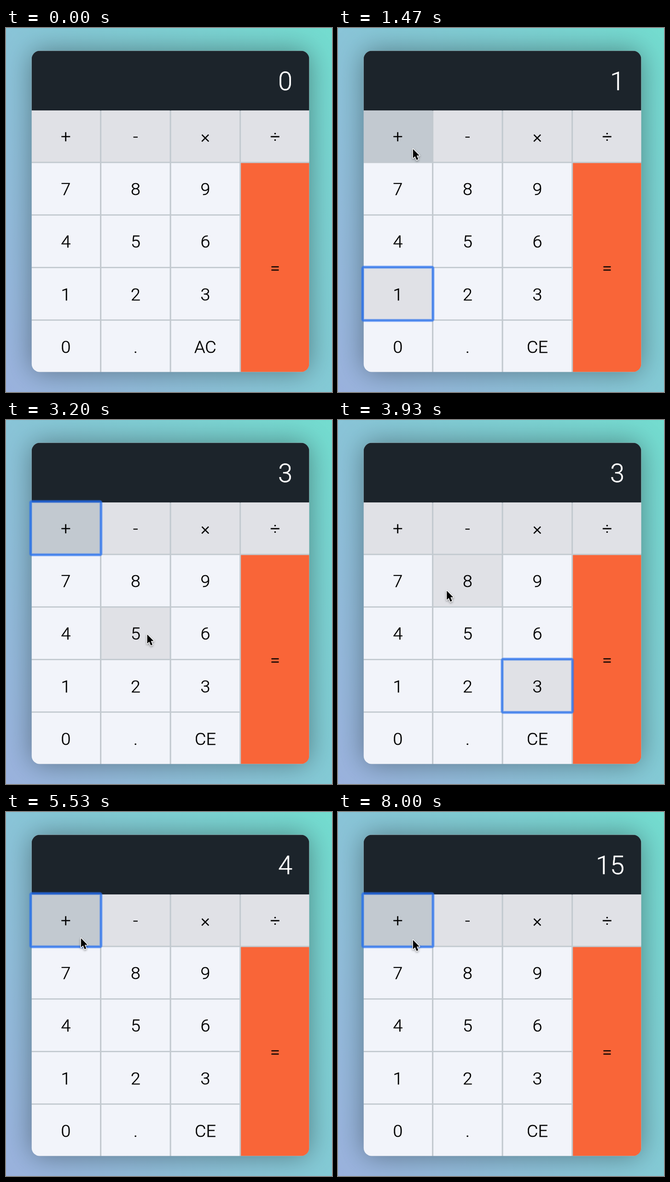
These frames come from a looping animation (708x791 px, 8.14 s). An HTML page with a canvas:

```html
<!DOCTYPE html>
<html lang="en">
<head>
<meta charset="utf-8">
<title>Calculator</title>
<style>
  html, body { margin: 0; width: 100%; height: 100%; overflow: hidden; }
  canvas { display: block; }
</style>
</head>
<body>
<canvas id="stage" width="708" height="791"></canvas>
<script>
const ctx = document.getElementById('stage').getContext('2d');
const W = 708, H = 791, LOOP = 8140, TICK = 200 / 3;
const CARD = { x: 55.7, y: 49.5, w: 602.8, h: 698, r: 18 };
const SCREEN_BOTTOM = 179.3;
const COL = { step: 151.5, size: 148.4 };
const ROW = { step: 114.2, size: 111.4 };
const COLORS = {
  gap: '#c2c9cf', screen: '#1c242b', key: '#f2f4fa',
  operator: '#e0e1e6', active: '#c2c9d0', equal: '#f96538'
};

const keys = ['+-×÷', '789', '456', '123', '0.C'].flatMap((line, row) =>
  [...line].map((label, col) => makeKey(label, col, row, 1)));
keys.push(makeKey('=', 3, 1, 4));

function makeKey(label, col, row, span) {
  const x = CARD.x + col * COL.step, y = SCREEN_BOTTOM + row * ROW.step;
  const w = COL.size, h = ROW.size + (span - 1) * ROW.step;
  const type = row === 0 ? 'operator' : label === '=' ? 'equal' : 'digit';
  return { label, type, x, y, w, h, cx: x + w / 2, cy: y + h / 2 };
}

// The keys pressed in turn, and when
const HOLD = 110, SETTLE = 85, LONGEST_MOVE = 650;
const pressTimes = [1000, 1550, 2130, 2730, 3530, 4200, 4900, 5530, 6400, 7530];
const presses = pressTimes.map((down, i) => {
  const key = keys.find(k => k.label === '1+2+3+4+5+'[i]);
  return { key, down, up: down + HOLD, ...restPoint(key, i) };
});

// Digits are approached from the left; the hand sinks a little on each visit to plus
function restPoint(key, i) {
  return key.label === '+'
    ? { x: key.cx + 33, y: key.cy + 26 + 1.9 * i }
    : { x: 41 + 0.8 * key.cx, y: key.cy };
}

function pointerAt(t) {
  let from = { x: 664, y: 650, up: 0 };
  for (const press of presses) {
    const arrive = press.down - SETTLE;
    if (t < arrive) {
      const leave = Math.max(from.up, arrive - LONGEST_MOVE);
      if (!from.up && t < leave) return null;
      const u = Math.max(0, (t - leave) / (arrive - leave));
      const s = u * u * (3 - 2 * u);
      return { x: from.x + (press.x - from.x) * s, y: from.y + (press.y - from.y) * s };
    }
    from = press;
  }
  return from;
}

function focusAt(t) {
  const last = presses.filter(p => p.down <= t).pop();
  return last && last.key;
}

function displayAt(t) {
  let total = 0, shown = 0;
  for (const { key } of presses.filter(p => p.up <= t)) {
    shown = key.label === '+' ? total += shown : Number(key.label);
  }
  return String(shown);
}

const contains = (k, p) =>
  p && p.x >= k.x && p.x <= k.x + k.w && p.y >= k.y && p.y <= k.y + k.h;

function rounded(x, y, w, h, r) {
  ctx.beginPath();
  ctx.roundRect(x, y, w, h, r);
}

function text(value, x, y, size, color, align) {
  ctx.font = `300 ${size}px Roboto, sans-serif`;
  ctx.fillStyle = ctx.strokeStyle = color;
  ctx.lineWidth = 0.5;
  ctx.textAlign = align;
  ctx.fillText(value, x, y);
  ctx.strokeText(value, x, y);
}

function drawBackground() {
  const angle = 236 * Math.PI / 180, dx = Math.sin(angle), dy = -Math.cos(angle);
  const half = (Math.abs(W * dx) + Math.abs(H * dy)) / 2;
  const g = ctx.createLinearGradient(W / 2 - dx * half, H / 2 - dy * half,
    W / 2 + dx * half, H / 2 + dy * half);
  g.addColorStop(0, '#73ddd0');
  g.addColorStop(1, '#9bb2de');
  ctx.fillStyle = g;
  ctx.fillRect(0, 0, W, H);
}

function keyColor(key, lit) {
  if (key.type === 'equal') return COLORS.equal;
  if (key.type === 'operator') return lit ? COLORS.active : COLORS.operator;
  return lit ? COLORS.operator : COLORS.key;
}

function drawCard(display, focus, pointer) {
  ctx.save();
  ctx.shadowColor = 'rgba(0,0,0,.38)';
  ctx.shadowBlur = 58;
  ctx.fillStyle = COLORS.gap;
  rounded(CARD.x, CARD.y, CARD.w, CARD.h, CARD.r);
  ctx.fill();
  ctx.restore();

  ctx.save();
  ctx.clip();
  ctx.fillStyle = COLORS.screen;
  ctx.fillRect(CARD.x, CARD.y, CARD.w, SCREEN_BOTTOM - CARD.y);
  for (const key of keys) {
    ctx.fillStyle = keyColor(key, key === focus || contains(key, pointer));
    ctx.fillRect(key.x, key.y, key.w, key.h);
    const label = key.label !== 'C' ? key.label : display === '0' ? 'AC' : 'CE';
    text(label, key.cx, key.cy + 14, 37.7, '#000', 'center');
  }
  text(display, 622, 134.7, 56, '#fff', 'right');
  ctx.restore();
}

function strokeRing(key, width, alpha) {
  ctx.lineWidth = width;
  ctx.strokeStyle = `rgba(38,112,240,${alpha})`;
  rounded(key.x - 2.2, key.y - 2.2, key.w + 4.4, key.h + 4.4, 2.5);
  ctx.stroke();
}

function drawFocus(key) {
  strokeRing(key, 7, 0.35);
  strokeRing(key, 4.2, 0.67);
}

const arrow = new Path2D('M0 0V19.8L4.4 15.8L7.8 23.8L11.4 22.2L8 14.4H14Z');

function drawPointer({ x, y }) {
  ctx.save();
  ctx.translate(x, y);
  ctx.lineWidth = 2.8;
  ctx.lineJoin = 'round';
  ctx.strokeStyle = '#fff';
  ctx.shadowColor = 'rgba(0,0,0,.4)';
  ctx.shadowBlur = 4;
  ctx.shadowOffsetY = 2;
  ctx.stroke(arrow);
  ctx.shadowColor = 'transparent';
  ctx.fillStyle = '#000';
  ctx.fill(arrow);
  ctx.restore();
}

function draw() {
  const now = performance.now() % LOOP;
  const t = Math.floor((now + 4) / TICK) * TICK;
  const pointer = pointerAt(t), focus = focusAt(t);
  drawBackground();
  drawCard(displayAt(t), focus, pointer);
  if (focus) drawFocus(focus);
  if (pointer) drawPointer(pointer);
  requestAnimationFrame(draw);
}
draw();
</script>
</body>
</html>
```
